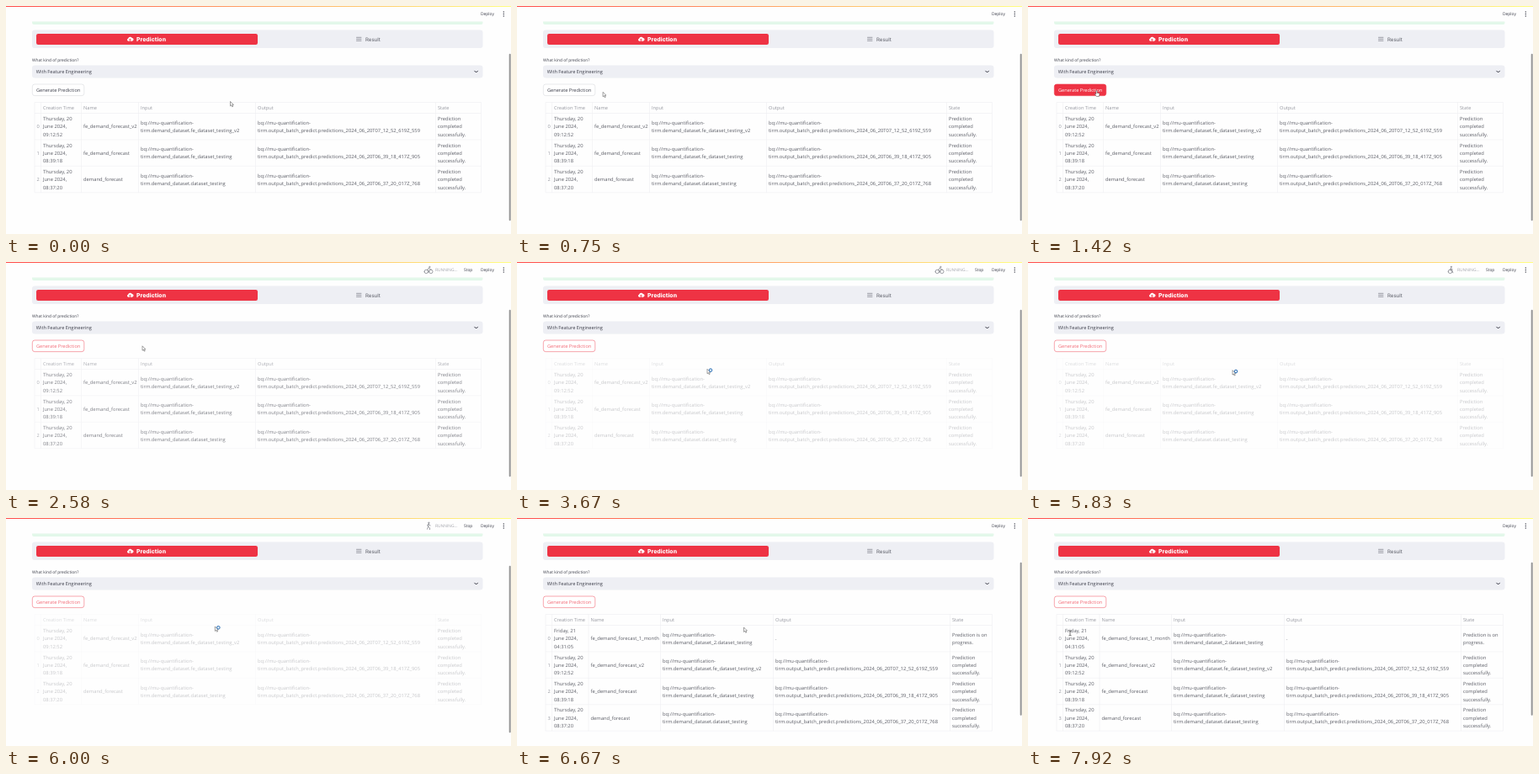
These frames come from a looping animation (600x271 px, 8 s). An HTML page:

```html
<!DOCTYPE html>
<html lang="en">
<head>
<meta charset="utf-8">
<style>
html, body { margin: 0; width: 100%; height: 100%; overflow: hidden; background: #fefefe; }
svg { display: block; width: 100vw; height: 100vh; font: 5.64px "Open Sans", sans-serif; fill: #3c3e4a; text-rendering: geometricPrecision; }
.small { font-size: 4.9px; }
.table { font-size: 5.8px; fill: #5b5d66; }
.head { fill: #989aa2; font-size: 5.66px; }
.grid { fill: none; stroke: #eeeef2; stroke-width: .6; }
.line { fill: none; stroke: #777982; stroke-width: .7; stroke-linecap: round; stroke-linejoin: round; }
.pointer { fill: #fff; stroke: #444; stroke-width: .5; stroke-linejoin: round; }
</style>
</head>
<body>
<svg viewBox="0 0 600 271">
  <defs>
    <linearGradient id="rainbow"><stop stop-color="#ff4b4b"/><stop offset="1" stop-color="#fffd80"/></linearGradient>
  </defs>
  <rect width="600" height="1" fill="url(#rainbow)"/>
  <path d="M31 18.5h535.5v1.500q0 2-2 2h-531.500q-2 0-2-2z" fill="#e3f8ea"/>
  <g class="small">
    <text x="564" y="11.3">Deploy</text>
    <g id="running">
      <text x="510" y="11.3" fill="#a3a4ab">RUNNING...</text>
      <text x="544" y="11.3">Stop</text>
      <path id="sport" class="line"/>
    </g>
  </g>
  <circle cx="591.3" cy="7" r=".7"/><circle cx="591.3" cy="9.5" r=".7"/><circle cx="591.3" cy="12" r=".7"/>

  <rect x="31" y="28.5" width="535.5" height="21.5" rx="3" fill="#eeeff4"/>
  <rect x="36" y="33" width="263" height="13" rx="2.2" fill="#ee3344"/>
  <path d="M145.400 41.700a1.700 1.700 0 0 1-.2-3.300a2.400 2.400 0 0 1 4.500-.3a1.800 1.800 0 0 1 .1 3.600z" fill="#fff"/>
  <path d="M147.400 42.500v-3.200m-1.100 1l1.100-1l1.100 1" class="line" style="stroke:#ee3344"/>
  <text x="155" y="41.8" fill="#fff" style="font:800 6.9px Inter,sans-serif">Prediction</text>
  <path d="M416.500 37.300h5.500m-5.500 2h5.500m-5.500 2h5.500" class="line"/>
  <text x="427" y="41.6" fill="#5a5c66" style="font:6.1px Inter,sans-serif">Result</text>

  <text x="31" y="66" class="small">What kind of prediction?</text>
  <rect x="31" y="70.5" width="535.5" height="15" rx="3" fill="#eeeff4"/>
  <text x="35.8" y="80.2">With Feature Engineering</text>
  <path d="M556.800 77.200l1.800 1.800l1.800-1.800" class="line" style="stroke:#31333f;stroke-width:1"/>

  <rect id="button" x="31.3" y="93" width="61.5" height="13.6" rx="2.8" stroke-width=".6"/>
  <text id="caption" x="36" y="102">Generate Prediction</text>

  <g id="before" class="table"></g>
  <g id="after" class="table"></g>
  <rect id="thumb" x="597.7" width="2" rx="1" fill="#969696"/>

  <g id="cursor">
    <path id="arrow" class="pointer" d="M0 0v5.400l1.300-1.100l.9 2l1-.4l-.9-2h1.600z"/>
    <path id="hand" class="pointer" d="M-.6 .5q.6-1 1.200 0v2.200l2.400 .6q.6 .2 .5 1l-.6 2.700h-3l-2-2.700q.2-1 1.500-.1z"/>
    <path id="beam" class="line" style="stroke:#444" d="M-1.200-3q1.200 0 1.200 .7q0-.7 1.200-.7M0-2.300v4.600M-1.200 3q1.200 0 1.200-.7q0 .7 1.200 .7"/>
    <circle id="busy" cx="4" cy="1.3" r="1.8" fill="#dcecf9" stroke="#2d6fb5"/>
  </g>
</svg>
<script>
const $ = id => document.getElementById(id);
const show = (id, on) => $(id).style.display = on ? '' : 'none';
const RED = '#ee3344', SOFT_RED = '#f26a76';
const TOP = 114.5, HEAD = 13, ROW = 31.4, LEFT = 34, RIGHT = 564.5, LEADING = 9.3;

const uri = path => ['bq://mu-quantification-', 'tirm.' + path];
const output = stamp => uri('output_batch_predict.predictions_2024_06_20T' + stamp);
const done = ['Prediction', 'completed', 'successfully.'];
const job = (time, name, input, stamp) =>
  [['Thursday, 20', 'June 2024,', time], [name], uri('demand_dataset.' + input), output(stamp), done];

const jobs = [
  job('09:12:52', 'fe_demand_forecast_v2', 'fe_dataset_testing_v2', '07_12_52_619Z_559'),
  job('08:39:18', 'fe_demand_forecast', 'fe_dataset_testing', '06_39_18_417Z_905'),
  job('08:37:20', 'demand_forecast', 'dataset_testing', '06_37_20_017Z_768')
];
const newJob = [['Friday, 21', 'June 2024,', '04:31:05'], ['fe_demand_forecast_1_month'],
  uri('demand_dataset_2.dataset_testing'), ['.'], ['Prediction is on', 'progress.']];

const label = (x, y, s, cls = '') => `<text x="${x}" y="${y}" class="${cls}">${s}</text>`;

function table(columns, rows) {
  const bottom = TOP + HEAD + rows.length * ROW;
  let grid = `M${LEFT} ${TOP}H${RIGHT}V${bottom}H${LEFT}z`;
  let text = '';
  ['Creation Time', 'Name', 'Input', 'Output', 'State'].forEach((title, i) => {
    grid += `M${columns[i] - 2.5} ${TOP}V${bottom}`;
    text += label(columns[i], 123.3, title, 'head');
  });
  rows.forEach((cells, r) => {
    const y = TOP + HEAD + r * ROW, middle = y + ROW / 2 + 2.2;
    grid += `M${LEFT} ${y}H${RIGHT}`;
    text += label(36.5, middle, r, 'head');
    cells.forEach((lines, c) => lines.forEach((s, i) => {
      text += label(columns[c], middle + (i - (lines.length - 1) / 2) * LEADING, s);
    }));
  });
  return `<path class="grid" d="${grid}"/>${text}`;
}
$('before').innerHTML = table([44, 92, 160, 299, 513], jobs);
$('after').innerHTML = table([44, 87.5, 173, 307, 517], [newJob, ...jobs]);

const ring = (x, y, r) => `M${x - r} ${y}a${r} ${r} 0 1 0 ${2 * r} 0a${r} ${r} 0 1 0 ${-2 * r} 0`;
const sports = [
  ring(501.5, 11.3, 2.3) + ring(503, 5.8, .7) + 'M502.500 7.200l-1 2.600h2.300l1.100 3M502.300 8l2 .8',
  ring(502.5, 5.8, .7) + 'M502 7.200l-.3 3l1.800 1.500v2M501.700 10.200l-1.200 3M502 7.500l-1.700 1.500M502 7.500l2.200 1.500',
  ring(499.2, 11.4, 2.2) + ring(504.8, 11.4, 2.2) + ring(503.5, 6, .7) + 'M502.500 7.200l-2 1.800l2 1.400l-.8 2M502.500 7.400l1.200 1.400h1.500',
  ring(502, 6.3, .7) + 'M497.500 12.800q2.200-1.200 4.500 0t4.500 0M499 11l2.500-3l2.500 2.500M501.500 8h2.800',
  ring(503, 5.8, .7) + 'M502.500 7.200l-1 3l2 1.200l-.5 2.200M501.500 10.200l-1 1.700l-2 .2M502.400 7.500l-2 .5l-.6 1.400M502.400 7.500l1.300 1.500l1.300-.2'
];

// time, x, y of the pointer's hot spot
const path = [
  [80, 266.5, 113.5], [920, 82.5, 101], [1170, 81.5, 100.5], [1700, 81.5, 100.5],
  [2400, 162, 99.8], [2650, 162, 99.8], [3600, 226, 127.3], [3830, 226, 127.3],
  [4250, 232.5, 128.3], [4830, 232.5, 128.3], [5580, 243, 128.7], [5830, 243, 128.7],
  [6420, 269.5, 130], [6750, 269.5, 130], [7250, 248, 131.5], [7880, 50, 136.8]
];
const clamp = v => Math.min(1, Math.max(0, v));
const smooth = v => v * v * (3 - 2 * v);

function pointerAt(t) {
  const i = Math.max(1, path.findIndex(p => p[0] > t));
  const [a, b] = t >= path.at(-1)[0] ? path.slice(-2) : [path[i - 1], path[i]];
  const k = smooth(clamp((t - a[0]) / (b[0] - a[0])));
  return [a[1] + (b[1] - a[1]) * k, a[2] + (b[2] - a[2]) * k];
}

function draw(t) {
  const [x, y] = pointerAt(t);
  const fresh = t >= 6240, running = t >= 1740 && !fresh;
  const hover = x < 92.5 && y < 106.5;
  const pressed = t >= 1410 && t < 1580;
  const active = hover || t >= 1410;
  const busy = t >= 2990 && !fresh;
  const beam = fresh && x < 66;

  $('button').setAttribute('fill', pressed ? RED : '#fff');
  $('button').setAttribute('stroke', pressed ? RED : active ? SOFT_RED : '#d9dade');
  $('caption').setAttribute('fill', pressed ? '#fff' : active ? SOFT_RED : '#3c3e4a');

  show('running', running);
  const sport = Math.floor((t - 4416) / 250) + 20;
  $('sport').setAttribute('d', sports[sport % 5]);

  show('before', !fresh);
  show('after', fresh);
  $('before').style.opacity = 1 - .67 * smooth(clamp((t - 2200) / 1000));
  $('thumb').setAttribute('y', fresh ? 52.8 : 56.8);
  $('thumb').setAttribute('height', fresh ? 182 : 198.5);

  $('cursor').setAttribute('transform', `translate(${x} ${y})`);
  show('arrow', !hover && !beam);
  show('hand', hover);
  show('beam', beam);
  show('busy', busy);
}

function tick(now) {
  draw(Math.floor(now % 8000 * .012 + .05) / .012);
  requestAnimationFrame(tick);
}
requestAnimationFrame(tick);
</script>
</body>
</html>
```
